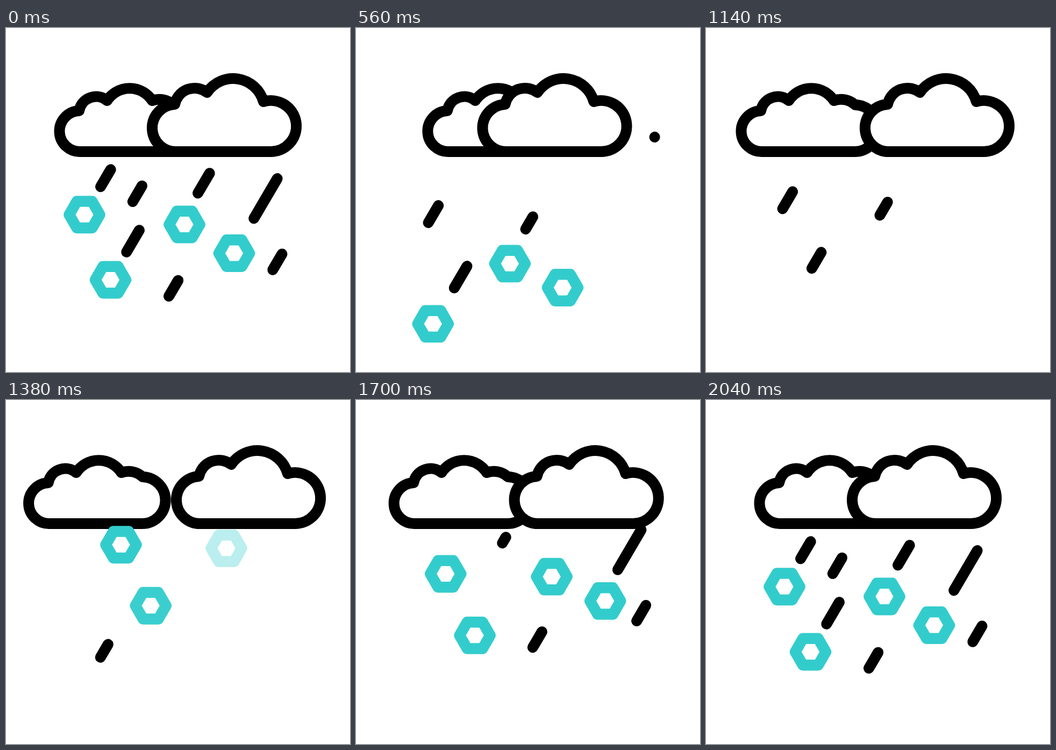
Animation, 640 px wide and 640 px high, one loop 2.4 s. Source, as an HTML page with a canvas:

```html
<!DOCTYPE html>
<html>
<head>
<meta charset="utf-8">
<style>
  html, body { margin: 0; width: 100%; height: 100%; overflow: hidden; background: #fff; }
  canvas { display: block; width: 100vmin; height: 100vmin; }
</style>
</head>
<body>
<canvas width="640" height="640"></canvas>
<script>
const ctx = document.querySelector('canvas').getContext('2d');
const LOOP = 2400, REST = 2030, STEP = 20, WIPE = 200, FADE = 150;
const SLANT = 120.4 * Math.PI / 180;

const backCloud = new Path2D('M139 230A38 38 0 0 1 136 154A32 32 0 0 1 188 135A50 50 0 0 1 272 135A39 39 0 0 1 311.5 143A43.5 43.5 0 0 1 309.5 230Z');
const frontCloud = new Path2D('M318 230A44 44 0 0 1 314 142A37.5 37.5 0 0 1 374 120A58.5 58.5 0 0 1 479 137A47.5 47.5 0 1 1 492 230Z');

// The rain falls three times; a drop's wipe starts at base + span * its delay
const falls = [
  { from: 0, to: 960, start: [0, 0], end: [-63.5, 102.5], leave: [177, 538] },
  { from: 515, to: 1375, start: [51.5, -78], end: [-48.5, 62], enter: [556, 585], leave: [773, 517] },
  { from: 1370, to: REST, start: [51.5, -77], end: [0, 0], enter: [1490, 440] }
];

const drop = (x, y, length, enter, leave) => ({ x, y, length, enter, leave });
const drops = [
  drop(461.2, 354.3, 86, 0, 0),
  drop(496.3, 449.8, 34, 0.05, 0.25),
  drop(303, 499, 34, 0.05, 0.25),
  drop(235.8, 323, 34, 0.28, 0.3),
  drop(357, 307.3, 43, 0.56, 0.55),
  drop(176, 295.3, 37, 0.67, 0.78),
  drop(224.2, 416.7, 47, 0.78, 1)
];

const stone = (x, y, delay) => ({ x, y, delay });
const stones = [
  stone(146, 347.3, 0),
  stone(194.5, 468.5, 0.43),
  stone(332, 365.5, 0.72),
  stone(424.5, 419, 1)
];

const mix = (a, b, k) => a + (b - a) * k;

function ease(t, from, to) {
  const p = Math.min(1, Math.max(0, (t - from) / (to - from)));
  return p < 0.5 ? 2 * p * p : 1 - 2 * (1 - p) ** 2;
}

function drawCloud(path, t, near, far) {
  const x = near * ease(t, 0, 712) + (far - near) * ease(t, 712, 1372) - far * ease(t, 1372, REST);
  ctx.save();
  ctx.translate(x, 0);
  ctx.fill(path);
  ctx.stroke(path);
  ctx.restore();
}

function drawFall(t, { from, to, start, end, enter, leave }) {
  if (t < from) return;
  const k = ease(t, from, to);
  const wipe = ([base, span], delay) => ease(t, base + span * delay, base + span * delay + WIPE);
  for (const d of drops) {
    const head = leave ? wipe(leave, d.leave) : 0;
    const tail = enter ? wipe(enter, d.enter) : 1;
    if (tail <= head) continue;
    ctx.beginPath();
    for (const part of [head, tail]) {
      const up = d.length * (1 - part);
      ctx.lineTo(d.x + mix(start[0], end[0], k) - up * Math.cos(SLANT),
                 d.y + mix(start[1], end[1], k) - up * Math.sin(SLANT));
    }
    ctx.stroke();
  }
}

function drawHexagon(x, y, alpha) {
  ctx.globalAlpha = alpha;
  ctx.beginPath();
  for (let a = 0; a < 6; a++) {
    ctx.lineTo(x + 28.5 * Math.cos(a * Math.PI / 3), y + 28.5 * Math.sin(a * Math.PI / 3));
  }
  ctx.closePath();
  ctx.stroke();
  ctx.globalAlpha = 1;
}

function drawStone(t, { x, y, delay }) {
  const gone = 560 + 340 * delay, back = 1150 + 235 * delay;
  const out = ease(t, 0, gone), home = 1 - ease(t, back, 2012);
  drawHexagon(x - 56 * out, y + 89.5 * out, 1 - ease(t, gone - FADE, gone));
  drawHexagon(x + 79.3 * home, y - 91 * home, ease(t, back, back + FADE));
}

function draw(t) {
  ctx.fillStyle = '#fff';
  ctx.fillRect(0, 0, 640, 640);
  ctx.lineWidth = 20;
  ctx.lineCap = ctx.lineJoin = 'round';
  ctx.strokeStyle = '#000';
  drawCloud(backCloud, t, 37.3, -57.4);
  drawCloud(frontCloud, t, -40.2, 45);
  falls.forEach(fall => drawFall(t, fall));
  ctx.lineWidth = 20.5;
  ctx.strokeStyle = '#33cccc';
  stones.forEach(s => drawStone(t, s));
}

const begin = performance.now();
function tick() {
  const t = Math.max(0, performance.now() - begin) % LOOP;
  draw(t >= REST ? 0 : t - t % STEP);
  requestAnimationFrame(tick);
}
tick();
</script>
</body>
</html>
```
